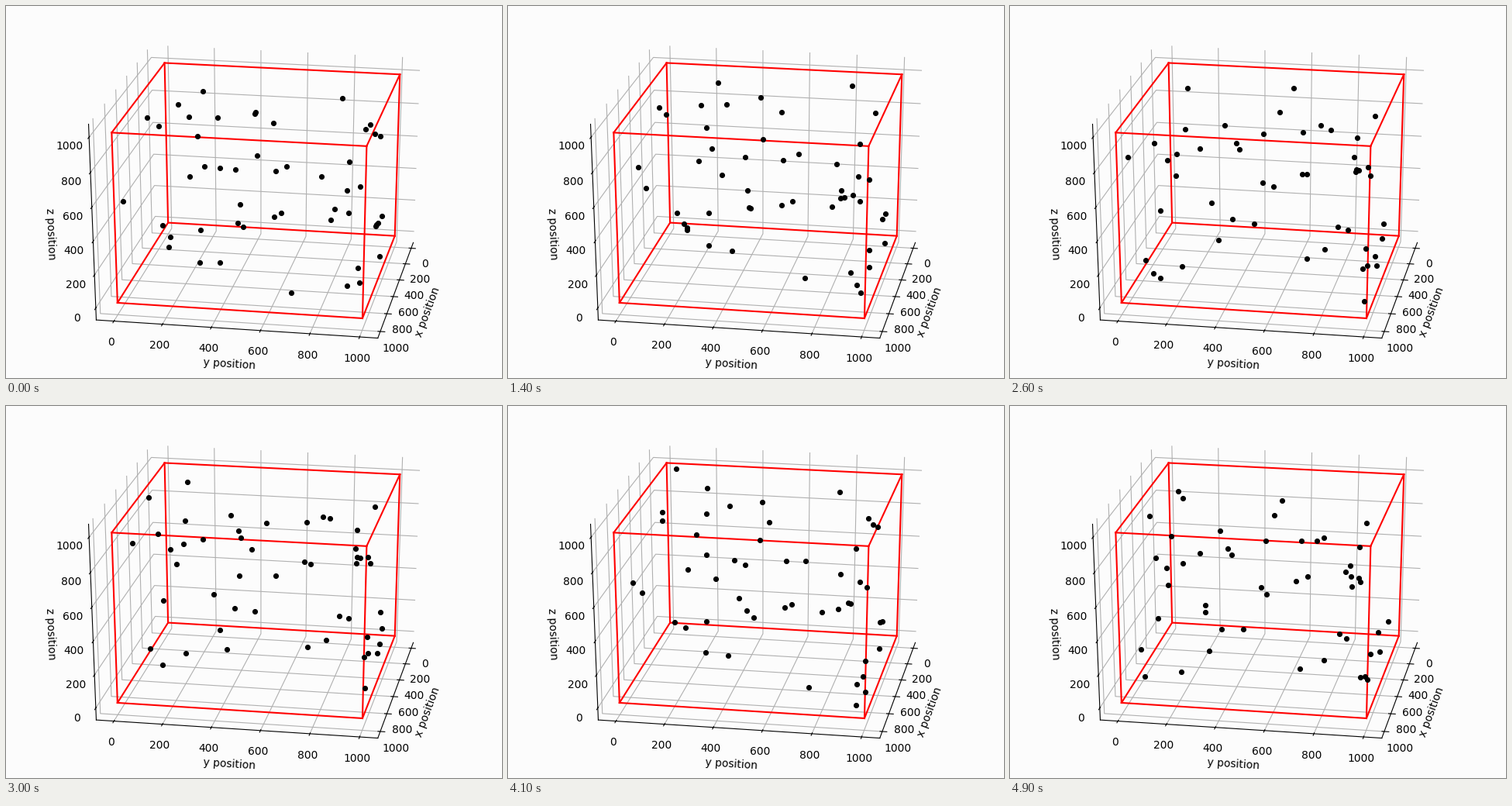
Write a matplotlib script that moves like this. It is 640 px wide and 480 px high and loops after 5000 ms.

```python
import itertools

import matplotlib.pyplot as plt
import numpy as np
from matplotlib.animation import FuncAnimation

WIDTH, HEIGHT = 640, 480
FRAMES, INTERVAL = 50, 100
PARTICLES = 50
SPAN = 1.1                            # box edge is 1, axis range is SPAN
LOW, HIGH = -0.05 - SPAN / 48, 1.05 + SPAN / 48
DELTA = SPAN / 12                     # unit for tick lengths and label gaps
ELEV, AZIM, DISTANCE = np.radians(25), np.radians(10), 10
VIEW_LOW, VIEW_SIZE = 0.095, 0.185    # visible window on the image plane


def project(points):
    """Perspective view of box coordinates, in pixels from the top left."""
    x, y, z = (np.atleast_2d(points).T - 0.5) / SPAN
    forward = x * np.cos(AZIM) + y * np.sin(AZIM)
    right = y * np.cos(AZIM) - x * np.sin(AZIM)
    up = z * np.cos(ELEV) - forward * np.sin(ELEV)
    depth = DISTANCE - forward * np.cos(ELEV) - z * np.sin(ELEV)
    u = (VIEW_LOW + right / depth) / VIEW_SIZE
    v = (VIEW_LOW + up / depth) / VIEW_SIZE
    return np.column_stack([WIDTH * u, HEIGHT * (1 - v)])


plt.rcParams.update({"font.family": "DejaVu Sans", "font.size": 10})
fig = plt.figure(figsize=(WIDTH / 100, HEIGHT / 100), dpi=100,
                 facecolor="#fcfcfc")
ax = fig.add_axes([0, 0, 1, 1])
ax.set(xlim=(0, WIDTH), ylim=(HEIGHT, 0))
ax.axis("off")


def draw_path(points, color, width, zorder):
    ax.plot(*project(points).T, color=color, lw=width, zorder=zorder)


def draw_axis(i, name, edge, tick_axis):
    """Axis i along the given edge, with grid, ticks and labels."""
    edge = np.array(edge, float)
    outward = np.sign(edge - 0.5)
    outward[i] = 0

    def on_edge(t, gap=0.0):
        point = edge + gap * outward
        point[i] = t
        return point

    ends = [on_edge(LOW), on_edge(HIGH)]
    draw_path(ends, "black", 0.8, 2)
    (u0, v0), (u1, v1) = project(ends)
    angle = np.degrees(np.arctan((v0 - v1) / (u1 - u0)))
    u, v = project(on_edge(0.5, 1.49 * DELTA))[0]
    ax.text(u, v, f"{name} position", ha="center", va="center",
            rotation=angle, rotation_mode="anchor")

    tick = np.zeros(3)
    tick[tick_axis] = DELTA
    first, second = [k for k in range(3) if k != i]
    for t in np.linspace(0, 1, 6):
        spot = on_edge(t)
        draw_path([spot + 0.2 * tick, spot - 0.1 * tick], "black", 0.8, 2)
        u, v = project(on_edge(t, 0.685 * DELTA))[0]
        ax.text(u, v, f"{1000 * t:.0f}", ha="center", va="top")

        # The grid line runs over the two panes at the back.
        corner = np.full(3, LOW)
        corner[i] = t
        start, end = corner.copy(), corner.copy()
        start[first] = end[second] = HIGH
        draw_path([start, corner, end], "#b0b0b0", 0.8, 1)


draw_axis(0, "x", (0, HIGH, LOW), tick_axis=1)
draw_axis(1, "y", (HIGH, 0, LOW), tick_axis=0)
draw_axis(2, "z", (HIGH, LOW, 0), tick_axis=0)

for a, b in itertools.combinations(itertools.product((0, 1), repeat=3), 2):
    if np.abs(np.subtract(a, b)).sum() == 1:
        draw_path([a, b], "red", 1.5, 3)

# Particles wander at random while the swarm gathers speed towards -x.
TOP_SPEED, RAMP = 0.043, 23.7
rng = np.random.default_rng(12)
start = rng.random((PARTICLES, 3))
wander = rng.normal(0, 0.004, (FRAMES, PARTICLES, 3)).cumsum(axis=0)


def swarm_at(frame):
    drift = TOP_SPEED * RAMP * np.log(np.cosh(frame / RAMP))
    return (start + wander[frame] - [drift, 0, 0]) % 1


dots, = ax.plot([], [], "o", color="black", ms=4.3, mew=0.8, zorder=4)


def update(frame):
    dots.set_data(*project(swarm_at(frame)).T)
    return dots,


animation = FuncAnimation(fig, update, frames=FRAMES, interval=INTERVAL,
                          repeat=True, repeat_delay=0)
plt.show()
```
